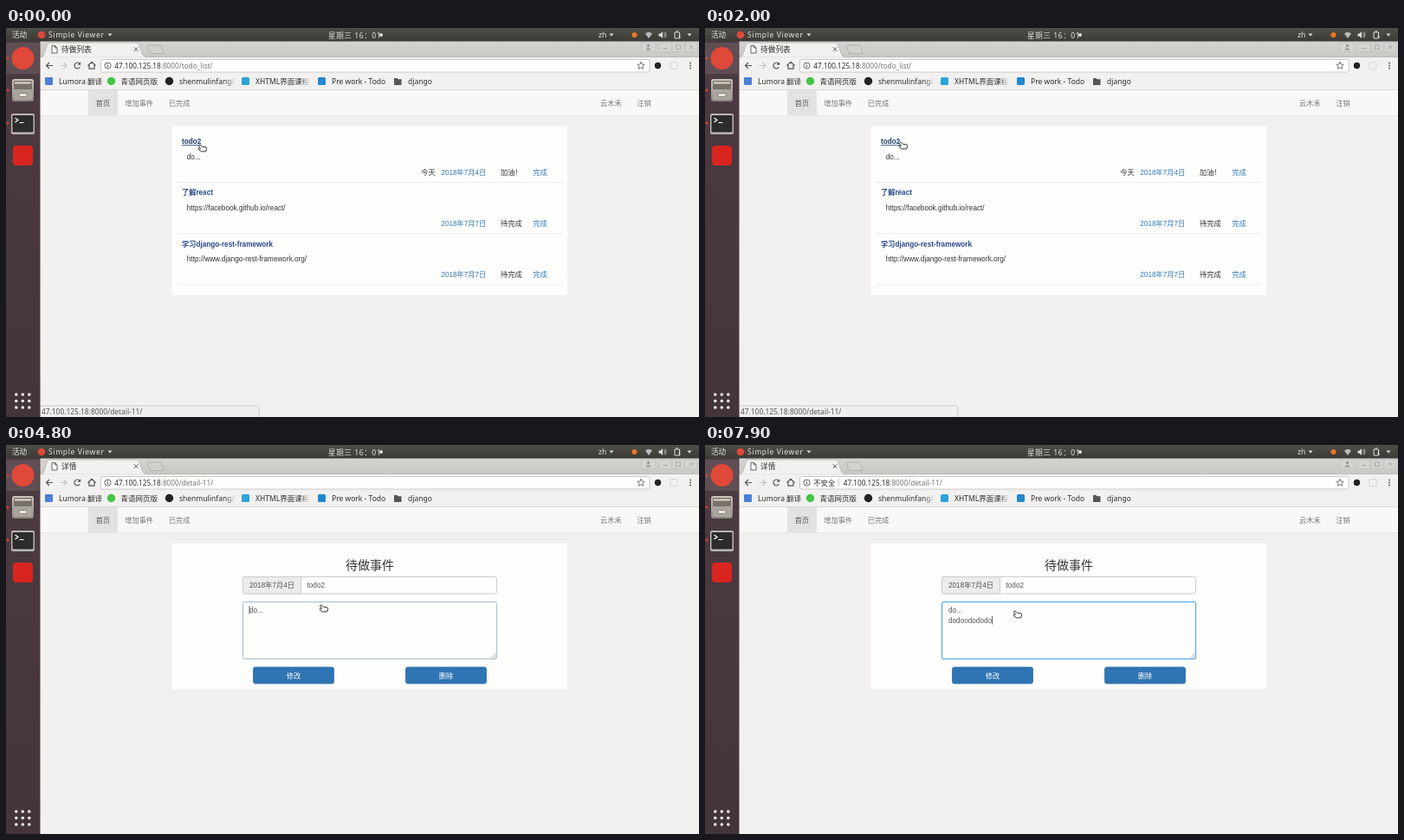
Write an HTML page that moves like this. It is 800 by 450 pixels and loops after 8 s.

```html
<!DOCTYPE html>
<html lang="zh-CN">
<head>
<meta charset="utf-8">
<title>Todo</title>
<style>
html, body { margin: 0; width: 100%; height: 100%; overflow: hidden; background: #f1f0ef; }
svg { display: block; width: 800px; height: 450px; }
text { white-space: pre; }
.ui { font: 8.3px "Noto Sans", "Noto Sans CJK SC", "Noto Sans CJK", sans-serif; fill: #2e2e2e; }
.ui.bar { font-size: 8.6px; font-weight: 500; fill: #e4e2dd; }
.page { font: 8.2px "Liberation Sans", "Noto Sans CJK SC", "Noto Sans CJK", sans-serif; fill: #333; }
.marks { font-size: 8.5px; }
.mid { text-anchor: middle; }
.link { fill: #337ab7; }
.title { font-weight: bold; fill: #27488a; }
.grey { fill: #777; }
.field { fill: #555; }
.line { fill: none; stroke: #555; stroke-width: 1.2; }
</style>
</head>
<body>
<svg viewBox="0 0 800 450">
  <defs>
    <linearGradient id="topFill" x2="0" y2="1"><stop stop-color="#504e48"/><stop offset="1" stop-color="#3b3a36"/></linearGradient>
    <linearGradient id="strip" x2="0" y2="1"><stop stop-color="#d6d4d1"/><stop offset="1" stop-color="#c9c7c4"/></linearGradient>
    <linearGradient id="dockFill" x2="0" y2="1"><stop stop-color="#4d3b42"/><stop offset="1" stop-color="#43353a"/></linearGradient>
    <linearGradient id="drawer" x2="0" y2="1"><stop stop-color="#c9c4bc"/><stop offset="1" stop-color="#8b867f"/></linearGradient>
    <linearGradient id="fade"><stop stop-color="#f2f1f0" stop-opacity="0"/><stop offset="1" stop-color="#f2f1f0"/></linearGradient>
    <clipPath id="chipClip"><rect id="chipBox" x="124" y="36" width="0" height="16"/></clipPath>
    <clipPath id="markClip"><path d="M185 53h81v17h-81zM285 53h66v17h-66z"/></clipPath>
  </defs>

  <!-- page -->
  <rect width="800" height="450" fill="#f1f0ef"/>
  <rect x="39" y="71" width="761" height="30" fill="#f9f8f7"/>
  <path d="M39 101.5H800" stroke="#e6e5e4"/>
  <rect x="95" y="72" width="34" height="29.5" fill="#e3e2e1"/>
  <g class="page">
    <text x="103.7" y="89.7" class="field">首页</text>
    <g class="grey">
      <text x="137.3" y="89.7">增加事件</text><text x="187.8" y="89.7">已完成</text>
      <text x="686" y="89.7">云木禾</text><text x="728.3" y="89.7">注销</text>
    </g>
  </g>

  <g id="list" class="page"></g>

  <g id="detail" class="page">
    <rect x="191.5" y="113.5" width="456.5" height="169" fill="#fdfdfc"/>
    <text x="420" y="143.5" class="mid" font-size="14">待做事件</text>
    <rect x="273.5" y="152.5" width="293" height="19.5" rx="2.3" fill="#fefefd" stroke="#ccc"/>
    <path d="M340.5 152.5V172H275.8a2.3 2.3 0 0 1-2.3-2.3V154.8a2.3 2.3 0 0 1 2.3-2.3z" fill="#edeceb" stroke="#ccc"/>
    <text x="281" y="165.3" class="field">2018年7月4日</text>
    <text x="347.5" y="165.3" class="field">todo2</text>
    <rect x="273.5" y="181.5" width="293" height="66" rx="2.3" fill="#fefefd" stroke="#ccc"/>
    <g id="focus" fill="none" stroke="#66afe9">
      <rect x="273.5" y="181.5" width="293" height="66" rx="2.3" stroke-width="3" opacity=".18"/>
      <rect x="273.5" y="181.5" width="293" height="66" rx="2.3"/>
    </g>
    <path d="M560.5 246.5l5-5M563.5 246.5l2-2" stroke="#888" stroke-width=".7"/>
    <text x="281" y="193.7" class="field">do...</text>
    <text id="typed" x="281" y="205.5" class="field"></text>
    <path id="caret" d="M.5 0v9.5" stroke="#333" stroke-width=".8"/>
    <g fill="#3075b3" stroke="#2b6aa5" stroke-width=".8">
      <rect x="285.5" y="257" width="93" height="19" rx="2.3"/><rect x="461.5" y="257" width="93" height="19" rx="2.3"/>
    </g>
    <g class="mid" fill="#fff"><text x="332" y="269.7">修改</text><text x="508" y="269.7">删除</text></g>
  </g>

  <!-- browser frame -->
  <rect x="39" y="15" width="761" height="19" fill="url(#strip)"/>
  <rect x="39" y="33.5" width="761" height="38" fill="#f2f1f0"/>
  <path d="M39 71.5H800" stroke="#dad8d6"/>
  <path d="M39 33.5H41C45 33.5 46 17 50 17H151C155 17 156 33.5 161 33.5H800" fill="#f2f1f0" stroke="#b5b3b0" stroke-width=".8"/>
  <path d="M164 20H177.500Q179 20 179.500 21.500L182 29.500H168Q166.500 29.500 166 28L163 21Q163 20 164 20z" fill="#d3d1ce" stroke="#aaa8a5" stroke-width=".8"/>
  <path d="M147.8 22.3l4.6 4.6m0-4.6l-4.6 4.6" stroke="#555"/>
  <path id="pageIcon" d="M53 20.5h3.7l2.3 2.3v6.2h-6zM56.5 20.5v2.5h2.5" fill="#fff" stroke="#555" stroke-width=".9"/>
  <path id="spinner" d="M0-3.7A3.7 3.7 0 0 1 2.6-2.6" class="line"/>
  <text id="tab" x="64" y="27.5" class="ui"></text>

  <g fill="#d6d4d1" stroke="#bebcb9" stroke-width=".6">
    <rect x="733.5" y="17" width="16.5" height="10.5" rx="1.5"/><rect x="754" y="17" width="14" height="10.5" rx="1.5"/>
    <rect x="769" y="17" width="14" height="10.5" rx="1.5"/><rect x="784" y="17" width="14" height="10.5" rx="1.5"/>
  </g>
  <circle cx="741.5" cy="20.5" r="1.7" fill="#999"/><path d="M738 25.5q3.5-5 7 0z" fill="#999"/>
  <path d="M758.5 23.5h5M773.5 20h5v4.5h-5zM789 20l4.5 4.5m0-4.5l-4.5 4.5" fill="none" stroke="#999" stroke-width=".8"/>

  <path d="M54 43.5H46.5m3.5-3.5l-3.5 3.5 3.5 3.5" class="line"/>
  <path d="M62.5 43.5H70m-3.5-3.5l3.5 3.5-3.5 3.5" class="line" style="stroke:#c4c4c4"/>
  <g id="reload"><path d="M85.3 45.2A3.4 3.4 0 1 1 84.8 41" class="line"/><path d="M86.2 39.3v3.5h-3.5z" fill="#555"/></g>
  <path id="stop" d="M79.5 40.5l6 6m0-6l-6 6" class="line"/>
  <path d="M94.5 43.5L99 39.3l4.5 4.2M96 43v4.2h6V43" class="line"/>
  <rect x="109.5" y="36.5" width="633.5" height="14.5" rx="1.5" fill="#fefefd" stroke="#cccac8"/>
  <circle cx="117.5" cy="43.5" r="3.6" class="line" style="stroke-width:.9"/><path d="M117.5 43v2.5M117.5 41.2v1" stroke="#555"/>
  <g clip-path="url(#chipClip)"><text x="125.3" y="46.5" class="ui">不安全</text><path d="M154.5 39v9" stroke="#ccc"/></g>
  <text id="url" x="125.3" y="46.5" class="ui" style="font-size:8.2px">47.100.125.18<tspan class="grey">:8000</tspan><tspan id="path" class="grey"></tspan></text>
  <path d="M733 39.2l1.2 2.8 3 .3-2.3 2 .7 3-2.6-1.6-2.6 1.6.7-3-2.3-2 3-.3z" class="line" style="stroke-width:.8"/>
  <circle cx="752.5" cy="43.5" r="3.7" fill="#222"/>
  <rect x="767" y="39.5" width="8" height="8" rx="1.5" fill="none" stroke="#d2d2d2"/>
  <g fill="#555"><circle cx="790" cy="40.5" r=".9"/><circle cx="790" cy="43.5" r=".9"/><circle cx="790" cy="46.5" r=".9"/></g>

  <!-- bookmarks -->
  <rect x="45" y="57" width="9" height="9" rx="1" fill="#4a80d8"/>
  <circle cx="121.5" cy="61.5" r="4.7" fill="#43c544"/>
  <circle cx="188.5" cy="61.5" r="4.7" fill="#222"/>
  <rect x="272" y="57" width="9" height="9" rx="1.5" fill="#2aa4d8"/>
  <rect x="360" y="57" width="9" height="9" rx="1.5" fill="#2188cf"/>
  <path d="M448 58h3.5l1 1.2h4V66h-8.5z" fill="#555"/>
  <g class="ui marks">
    <text x="61" y="64.7">Lumora 翻译</text><text x="132.5" y="64.7">青语网页版</text>
    <g clip-path="url(#markClip)"><text x="200" y="64.7">shenmulinfang/</text><text x="288" y="64.7">XHTML界面课程</text></g>
    <text x="376" y="64.7">Pre work - Todo</text><text x="464" y="64.7">django</text>
  </g>
  <rect x="253" y="55" width="13" height="14" fill="url(#fade)"/>
  <rect x="340" y="55" width="11" height="14" fill="url(#fade)"/>

  <g id="status">
    <path d="M39 437H289.5Q292 437 292 439.5V451H39z" fill="#f0efed" stroke="#c9c7c5" stroke-width=".9"/>
    <text x="41" y="446.5" class="ui" style="font-size:8.4px;fill:#555">47.100.125.18:8000/detail-11/</text>
  </g>

  <!-- desktop -->
  <rect width="39.5" height="450" fill="url(#dockFill)"/>
  <rect y="17" width="38.5" height="36" fill="#5f4e54"/>
  <circle cx="19.5" cy="35" r="13" fill="#e0483a"/>
  <rect x="7" y="59" width="25" height="26" rx="2.5" fill="url(#drawer)"/>
  <rect x="9" y="61" width="21" height="10" rx="1" fill="#77716a"/><rect x="9" y="73" width="21" height="10" rx="1" fill="#aaa59d"/>
  <path d="M10 63.5h19" stroke="#ddd9d2" stroke-width="2"/><rect x="15" y="75.5" width="9" height="4" rx="1" fill="#e8e5df" stroke="#6d6862" stroke-width=".7"/>
  <rect x="6" y="99" width="27" height="24" rx="2" fill="#b9b6b2"/><rect x="7.5" y="101" width="24" height="19.5" rx="1" fill="#2d2b2c"/>
  <path d="M10.5 104l3.5 2.5-3.5 2.5M15.5 109.5h5" fill="none" stroke="#fff" stroke-width="1.2"/>
  <rect x="8" y="136" width="23" height="23" rx="4" fill="#d9251f"/>
  <g fill="#e0452c"><circle cx="2" cy="35" r="1.5"/><circle cx="2" cy="72" r="1.5"/><circle cx="2" cy="110" r="1.5"/></g>
  <g id="grid" fill="#f1eef0"></g>
  <rect width="800" height="15.5" fill="url(#topFill)"/>
  <circle cx="41" cy="8" r="4.3" fill="#e0483a"/>
  <text x="7" y="11.3" class="ui bar">活动</text>
  <text x="49" y="11.2" class="ui bar" style="letter-spacing:.6px">Simple Viewer</text>
  <text x="372" y="11.5" class="ui bar" style="letter-spacing:.55px">星期三 16：01</text>
  <circle cx="433" cy="8" r="2" fill="#ddd"/>
  <text x="684" y="11" class="ui bar">zh</text>
  <path d="M117.5 6.5h5l-2.5 3zM696.5 6.5h5l-2.5 3zM786.5 6.5h5l-2.5 3z" fill="#ddd"/>
  <circle cx="725.5" cy="8" r="3" fill="#ee7623"/>
  <path d="M738 6.5q4-3.5 8 0l-4 5.5z" fill="#bbb"/>
  <path d="M753.5 6.5h2l2.5-2.5v8l-2.5-2.5h-2z" fill="#ddd"/><path d="M759.5 5.5q1.5 2.5 0 5M761 4.5q2.3 3.5 0 7" fill="none" stroke="#ccc" stroke-width=".8"/>
  <path d="M772 5h5.5v7H772zM773.5 3.8h2.5" fill="none" stroke="#ddd"/><path d="M778.5 7l-2 3h2l-1 2" fill="none" stroke="#ddd" stroke-width=".8"/>

  <path id="hand" d="M-4.5-2.7q.2-1.8 2-1.1l2.2 2.2 3.4.2q1.700.3 1.500 2l-.9 3.300h-5.300l-3.100-2.300q-.6-1.400 1-1.400l1.100.2z" fill="#fafaf9" stroke="#333" stroke-linejoin="round"/>
</svg>
<script>
const $ = id => document.getElementById(id);
const ramp = (t, a, b) => Math.min(1, Math.max(0, (t - a) / (b - a)));
const show = (id, on) => $(id).style.display = on ? '' : 'none';

const todos = [
  ['todo2', 'do...', '2018年7月4日', '加油！', '今天'],
  ['了解react', 'https://facebook.github.io/react/', '2018年7月7日', '待完成', ''],
  ['学习django-rest-framework', 'http://www.django-rest-framework.org/', '2018年7月7日', '待完成', '']
];
$('list').innerHTML = '<rect x="191.5" y="113.5" width="456.5" height="195.5" fill="#fdfdfc"/>' +
  todos.map(([title, note, date, state, day], i) => `<g transform="translate(0 ${i * 59.2})">
    <text x="203" y="134.3" class="title">${title}</text><text x="208.8" y="151.8">${note}</text>
    <text x="479.3" y="169.5">${day}</text><text x="502.3" y="169.5" class="link">${date}</text>
    <text x="571" y="169.5">${state}</text><text x="608.3" y="169.5" class="link">完成</text>
    <path d="M197 178.5H642" stroke="#ebebea"/></g>`).join('');
const firstTitle = $('list').querySelector('.title');

for (let i = 0; i < 9; i++)
  $('grid').innerHTML += `<circle cx="${11.8 + i % 3 * 7.5}" cy="${424 + (i / 3 | 0) * 7.5}" r="1.8"/>`;

// time, x, y of the pointer
const path = [[0, 227, 139], [900, 251, 139], [1400, 251, 139], [1800, 229, 136], [3300, 229, 136],
  [3600, 275, 145], [3800, 285, 149], [3900, 285, 149], [4300, 367, 189], [4800, 367, 189], [5300, 361, 196], [8000, 361, 196]];

function pointer(t) {
  const i = path.findIndex(p => p[0] > t);
  const [a, b] = [path[i - 1], path[i]];
  const k = ramp(t, a[0], b[0]);
  return [a[1] + (b[1] - a[1]) * k, a[2] + (b[2] - a[2]) * k];
}

function typedCount(t) {
  if (t < 6800) return 0;
  if (t < 7700) return Math.min(7, (t - 6700) / 100);
  return t < 7900 ? 8 + (t - 7700) / 100 : 11;
}

function draw(now) {
  const t = Math.floor(now % 8000 / 100) * 100;
  const loading = t >= 3100 && t < 3400, detail = t >= 3400;
  const [x, y] = pointer(t);
  $('hand').setAttribute('transform', `translate(${x} ${y})`);

  show('list', !detail);
  show('detail', detail);
  const hover = x < 230;
  firstTitle.style.textDecoration = hover ? 'underline' : 'none';
  firstTitle.style.fill = hover ? '#1d3f70' : '';
  $('status').style.opacity = t < 1400 ? 1 - ramp(t, 700, 1200) : ramp(t, 1500, 1800) * (1 - ramp(t, 3300, 3600));

  show('pageIcon', !loading);
  show('spinner', loading);
  $('spinner').setAttribute('transform', `translate(56 24) rotate(${(t - 3200) * .5 - 30})`);
  show('reload', !loading);
  show('stop', loading);
  $('tab').textContent = detail ? '详情' : loading ? '47.100.125.18:8000/' : '待做列表';
  $('tab').style.fontSize = loading ? '8.2px' : '8.7px';
  $('path').textContent = t < 3100 ? '/todo_list/' : '/detail-11/';
  const chip = ramp(t, 5800, 6100);
  $('chipBox').setAttribute('width', 35 * chip);
  $('url').setAttribute('x', 125.3 + 34.5 * chip);

  $('focus').style.opacity = ramp(t, 4700, 5000);
  $('typed').textContent = 'dodoodododo'.slice(0, typedCount(t));
  const newline = t >= 5900;
  const caretX = newline ? 281 + $('typed').getComputedTextLength() : t < 5700 ? 280.5 : 297;
  $('caret').setAttribute('transform', `translate(${caretX} ${newline ? 198 : 186})`);
  show('caret', t >= 4800 && t < 5300 || t >= 5700 && t < 6400 || t >= 6800);
}

let start;
function loop(now) {
  start ??= now;
  draw(now - start);
  requestAnimationFrame(loop);
}
requestAnimationFrame(loop);
</script>
</body>
</html>
```
